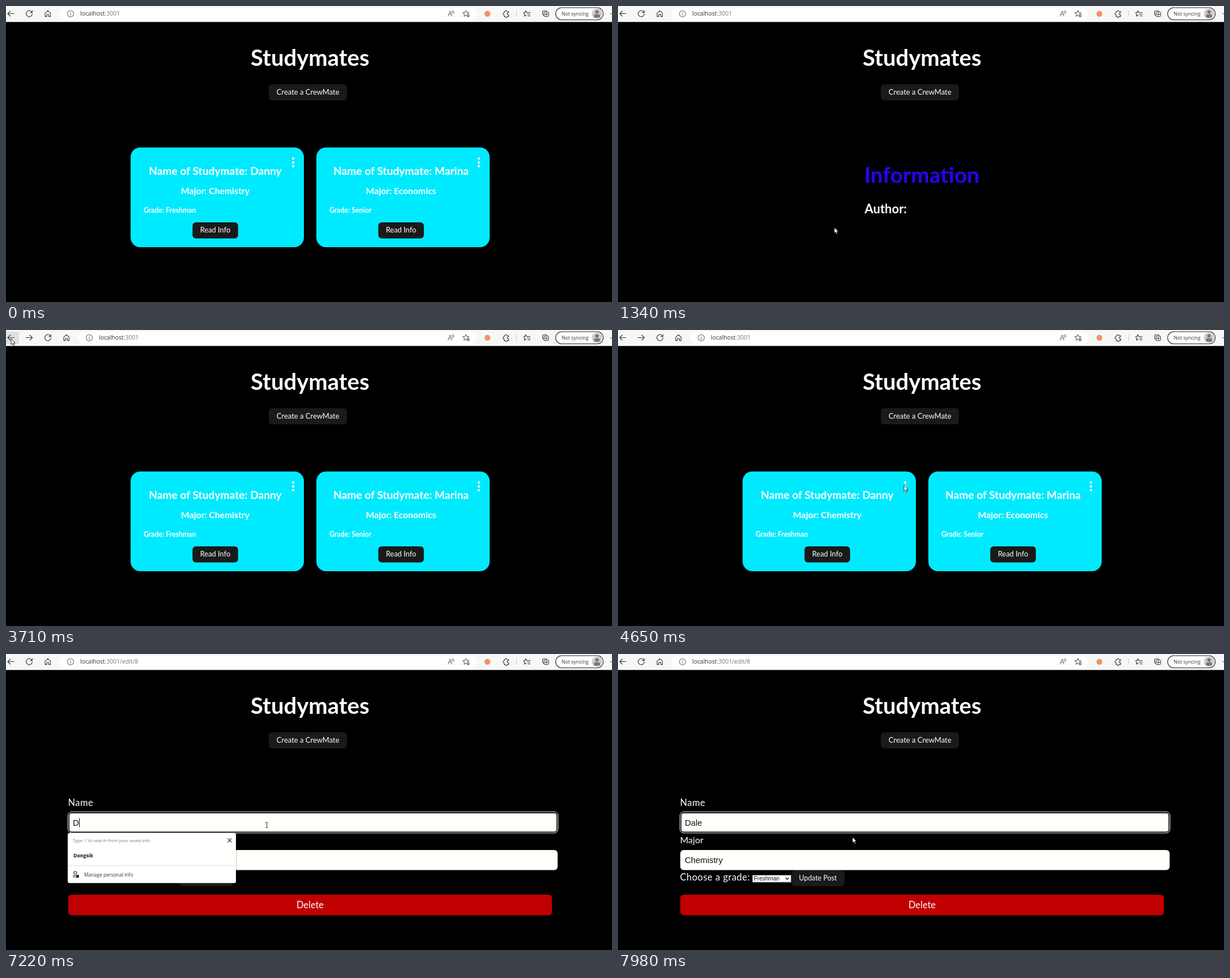
These frames come from a looping animation (1070x524 px, 8 s). An HTML page:

```html
<!DOCTYPE html>
<html lang="en">
<head>
<meta charset="utf-8">
<title>Studymates</title>
<style>
  html, body { margin: 0; width: 100%; height: 100%; overflow: hidden; background: #000; }
  svg { display: block; }
  text { font-family: Lato, sans-serif; fill: #fff; white-space: pre; }
  .b { font-weight: 700; }
  .mid { text-anchor: middle; }
  .ui { font-family: "Open Sans", "Noto Sans", sans-serif; fill: #333; }
  .field { font: 14.9px "Liberation Sans", Arial, sans-serif; fill: #111; }
  .icon { fill: none; stroke: #333; stroke-width: 1.1; stroke-linecap: round; stroke-linejoin: round; }
  .btn { fill: #1a1a1a; }
  .input { fill: #fffffb; }
</style>
</head>
<body>
<svg width="1070" height="524" viewBox="0 0 1070 524">
  <rect width="1070" height="28.3" fill="#f7f7f7"/>
  <rect id="backHover" x="-4" y="3" width="27" height="22" rx="3" fill="#e0e0de"/>
  <path class="icon" d="M14 13.5H3M7.5 9L3 13.5L7.5 18"/>
  <path id="forward" class="icon" d="M35 13.5H46.5M42 9L46.5 13.5L42 18"/>
  <rect id="bar" x="94" y="3" width="736" height="22" rx="11" fill="#fff"/>
  <g id="nav">
    <path class="icon" d="M46 11.5A5.4 5.4 0 1 0 46.4 14M46.3 8V11.6H42.7"/>
    <path class="icon" d="M69 12.6L73.7 8.4L78.4 12.6V18.6H75.4V15H72V18.6H69Z"/>
    <g class="icon" style="stroke:#666"><circle cx="114" cy="13.7" r="5.5"/><path d="M114 13V16.5M114 11V11.1"/></g>
    <text class="ui" x="131" y="17.4" font-size="10.4">localhost<tspan id="path" fill="#777"></tspan></text>
  </g>
  <g class="icon">
    <path stroke="#777" d="M780.5 18L784 9L787.5 18M781.8 15H786.2M787 9.5Q788.5 11 787.8 13M789 8Q791.5 10.5 790 13.5"/>
    <path stroke="#666" d="M812 8L813.6 11.4L817.4 11.9L814.6 14.4L815.3 18.2L812 16.3L808.7 18.2L809.4 14.4L806.6 11.9L810.4 11.4Z"/>
    <circle cx="816" cy="17" r="3" fill="#555" stroke="#fff" stroke-width=".6"/>
    <path stroke="#fff" stroke-width=".8" d="M814.6 17H817.4M816 15.6V18.4"/>
    <path d="M879.5 10H881.2A1.8 1.8 0 0 1 884.8 10H887.5V12H886.6A1.8 1.8 0 0 0 886.6 15.6H887.5V18.6H884.8A1.8 1.8 0 0 1 881.2 18.6H879.5V15.6A1.8 1.8 0 0 1 879.5 12Z"/>
    <path stroke="#ccc" d="M901.5 8.5V19"/>
    <path d="M921 11.5H919.2L917.8 8.3L916.4 11.5L913.8 12L915.8 14.3L915.3 18L918.5 16.2M921.5 11.5H925.5M920.5 14.5H925.5M921.5 17.5H925.5"/>
    <path d="M949.5 16.5Q947.5 16 947.5 14.5V10.5Q947.5 8.5 949.5 8.5H953.5Q955 8.5 955.3 10"/>
    <rect x="950" y="10.7" width="8" height="8" rx="1.6"/>
    <path d="M954 12.7V16.7M952 14.7H956"/>
    <rect x="970.5" y="3" width="84" height="21.5" rx="10.7" fill="#fff" stroke="#222"/>
  </g>
  <circle cx="850" cy="13.7" r="5.2" fill="#ef9468"/>
  <text class="ui" x="981" y="17" font-size="8.7">Not syncing</text>
  <circle cx="1043.5" cy="13.7" r="9" fill="#cdcbc9"/>
  <path fill="#777" d="M1043.5 7.5A3 3 0 0 1 1043.5 13.7A3 3 0 0 1 1043.5 7.5M1038 19.5Q1038 14.7 1040.5 14.7H1046.5Q1049 14.7 1049 19.5Q1043.5 22 1038 19.5"/>
  <circle cx="1068" cy="13.7" r=".9" fill="#333"/>

  <text class="b mid" x="536.8" y="105.8" font-size="40">Studymates</text>
  <rect class="btn" x="464" y="138.5" width="138" height="28.5" rx="6"/>
  <text class="mid" x="533.2" y="157.3" font-size="13">Create a CrewMate</text>

  <g id="list"></g>

  <g id="info" class="b">
    <text x="434.7" y="313" font-size="38.7" style="fill:#2c00ff">Information</text>
    <text id="loading" x="435.5" y="367.3" font-size="22">Author:</text>
    <g id="details">
      <text x="435.5" y="373" font-size="28.3">Danny</text>
      <text x="435.5" y="424" font-size="22.9">Chemistry</text>
      <text x="435.5" y="472.3" font-size="22.8">Author: Freshman</text>
    </g>
  </g>

  <g id="edit">
    <text x="109.5" y="268.5" font-size="16.5" letter-spacing=".5">Name</text>
    <rect class="input" x="110" y="280" width="864" height="36.5" rx="6"/>
    <g id="ring" fill="none">
      <rect x="109.5" y="279.6" width="865" height="37.2" rx="6.5" stroke="#fff"/>
      <rect x="111" y="281" width="862" height="34.4" rx="5" stroke="#000" stroke-width="1.8"/>
    </g>
    <rect id="selection" x="118" y="290" height="17" fill="#0078d7"/>
    <text id="name" class="field" x="118" y="303.5"></text>
    <path id="caret" stroke="#000" d="M.5 290.5V306.5"/>
    <text x="109.5" y="334.5" font-size="16">Major</text>
    <rect class="input" x="110" y="347" width="864" height="35.5" rx="6"/>
    <text class="field" x="118" y="370.3">Chemistry</text>
    <text x="109.5" y="400.5" font-size="16.5" letter-spacing=".5">Choose a grade:</text>
    <rect x="237.5" y="391.5" width="68" height="12.5" fill="#fff" stroke="#777"/>
    <text class="field" x="240" y="401.3" style="font-size:10px">Freshman</text>
    <path fill="none" stroke="#111" stroke-width="1.5" d="M296 396.3L298.7 399L301.4 396.3"/>
    <rect class="btn" x="306.5" y="383" width="93.5" height="28" rx="6"/>
    <text class="mid" x="353" y="401.3" font-size="12.4">Update Post</text>
    <rect x="110" y="426" width="854" height="36.5" rx="6" fill="#c00000"/>
    <text class="mid" x="537" y="450" font-size="16.4">Delete</text>
    <g id="popup">
      <rect x="109" y="317" width="299" height="90" rx="4" fill="#000" opacity=".12"/>
      <rect x="109" y="317" width="297" height="88.5" rx="3" fill="#fffffd"/>
      <text class="ui" x="118" y="333" font-size="7.7" style="fill:#777">Type '/' to search from your saved info</text>
      <path class="icon" d="M391.7 326.7L398 333M398 326.7L391.7 333"/>
      <text class="ui b" x="119" y="360" font-size="8.7" style="fill:#111">Dongsik</text>
      <path stroke="#ddd" d="M109 374.5H406"/>
      <g class="icon"><circle cx="122.3" cy="387.6" r="2.5"/><path d="M123 395.3Q118.5 395.5 118.7 392.3H123"/></g>
      <rect x="123.8" y="391" width="5" height="5" rx="1" fill="#222"/>
      <text class="ui" x="138" y="393.8" font-size="8.5">Manage personal info</text>
    </g>
  </g>

  <path id="arrow" fill="#fff" stroke="#000" stroke-width=".8" d="M0 0V10.3L2.4 8.2L4.1 12L5.8 11.2L4.1 7.6H7.2Z"/>
  <path id="beam" fill="none" stroke="#333" d="M-2.5 -4.5H-.8L0 -4L.8 -4.5H2.5M0 -4V4.5M-2.5 5H-.8L0 4.5L.8 5H2.5"/>
</svg>
<script>
const $ = id => document.getElementById(id);
const LOOP = 8000;

const card = (x, name, major, grade) => `
  <g transform="translate(${x})">
    <rect y="250.5" width="306" height="176.5" rx="17" fill="#00eaff"/>
    ${[270, 277, 283.5].map(y => `<circle cx="287" cy="${y}" r="2.2" fill="#e4fbff"/>`).join('')}
    <text class="b mid" x="149.5" y="299" font-size="19.2">Name of Studymate: ${name}</text>
    <text class="b mid" x="149.5" y="332.5" font-size="15.7">Major: ${major}</text>
    <text class="b" x="23" y="366" font-size="12.3">Grade: ${grade}</text>
    <rect class="btn" x="109.3" y="383" width="80.5" height="28.5" rx="6"/>
    <text class="mid" x="149.5" y="401.3" font-size="12.9">Read Info</text>
  </g>`;
$('list').innerHTML = card(220, 'Danny', 'Chemistry', 'Freshman') + card(548, 'Marina', 'Economics', 'Senior');

// Pointer stops: time, x, y
const stops = [
  [100, 921, 504], [170, 834, 473], [430, 834, 473], [530, 483, 420], [770, 483, 420],
  [1000, 382, 392], [1390, 382, 392], [1550, 454, 355], [1770, 454, 355], [1870, 493, 340],
  [2130, 493, 340], [2540, 520.6, 231.6], [2770, 520.6, 231.6], [2810, 500, 239], [2960, 101, 90],
  [3210, 101, 90], [3450, 9, 15.5], [4040, 9, 15.5], [4150, 450, 250], [4300, 450, 250],
  [4500, 505, 275], [4720, 505, 275], [4930, 484, 278], [5190, 484, 278], [5400, 460.5, 302.5],
  [7930, 460.5, 302.5], [7980, 414, 324], [LOOP, 414, 324]
];
const typed = [[0, 'Danny'], [7100, 'D'], [7270, 'Da'], [7350, 'Dal'], [7440, 'Dale']];

const show = (id, on) => { $(id).style.display = on ? '' : 'none'; };
const clamp = v => Math.max(0, Math.min(1, v));

function pointerAt(t) {
  const i = Math.max(1, stops.findIndex(s => s[0] >= t));
  const [t0, x0, y0] = stops[i - 1], [t1, x1, y1] = stops[i];
  const k = clamp((t - t0) / (t1 - t0));
  return [x0 + (x1 - x0) * k, y0 + (y1 - y0) * k];
}

function draw(t) {
  const within = (a, b) => t >= a && t < b;
  const info = within(1340, 3650), edit = t >= 4720, back = within(3650, 4720);
  show('info', info);
  show('edit', edit);
  show('list', !info && !edit);
  show('loading', t < 1620);
  show('details', t >= 1620);

  show('forward', back);
  show('backHover', within(3400, 4060));
  const shift = back ? 33 : 0;
  $('nav').setAttribute('transform', `translate(${shift})`);
  $('bar').setAttribute('x', 94 + shift);
  $('bar').setAttribute('width', 736 - shift);
  $('path').textContent = ':3001' + (edit ? '/edit/8' : within(1390, 3650) ? '/display/8' : '');

  const selected = within(6450, 7100);
  $('name').textContent = typed.findLast(s => s[0] <= t)[1];
  $('name').style.fill = selected ? '#fff' : '';
  const width = edit ? $('name').getComputedTextLength() : 0;
  show('ring', t >= 6340);
  show('selection', selected);
  $('selection').setAttribute('width', width);
  show('caret', within(6340, 7930) && !selected);
  $('caret').setAttribute('transform', `translate(${Math.round(118 + width)})`);
  $('popup').style.opacity = Math.min(clamp((t - 7100) / 100), clamp((7400 - t) / 140));

  const [x, y] = pointerAt(t);
  const beam = edit && y > 280 && y < 316;
  show('arrow', t >= 100 && !beam);
  show('beam', beam);
  $(beam ? 'beam' : 'arrow').setAttribute('transform', `translate(${x} ${y})`);
}

function tick() {
  draw(performance.now() % LOOP);
  requestAnimationFrame(tick);
}
tick();
</script>
</body>
</html>
```
